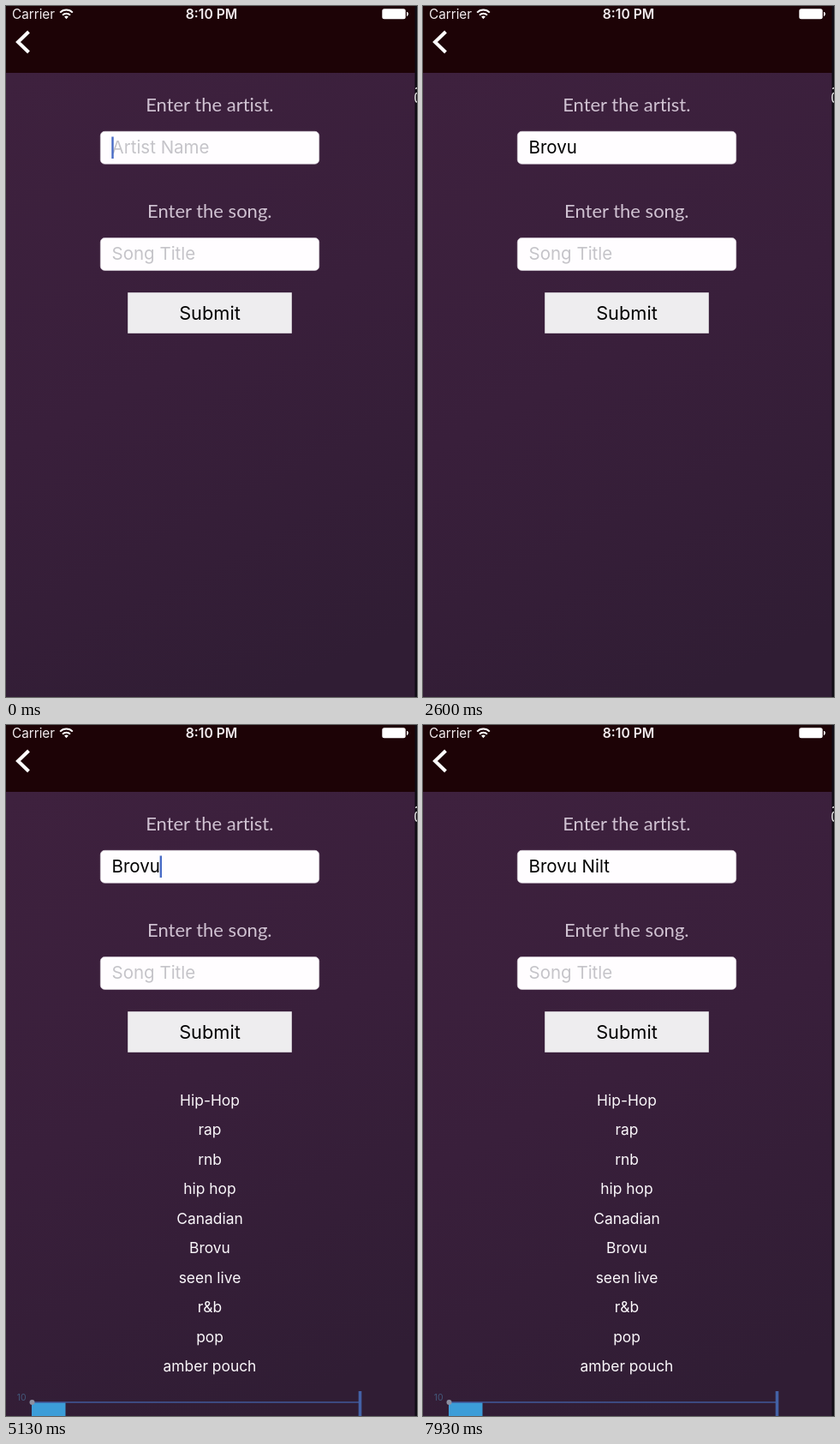
An HTML page for the animation above (8 s loop, 480 by 806 pixels).

```html
<!DOCTYPE html>
<html lang="en">
<head>
<meta charset="utf-8">
<title>Artist lookup</title>
<style>
  html, body { margin: 0; width: 100%; height: 100%; overflow: hidden; background: #12070d; }
  svg { display: block; width: 100%; height: 100%; font: 20.5px Inter, sans-serif; }
  text { white-space: pre; }
  .mid { text-anchor: middle; }
  .label { font: 22px Lato, sans-serif; font-variant-ligatures: none; fill: #d0c2d2; }
  .hint { fill: #c5c4c9; }
  .field { fill: #fffdff; stroke: #d9d1da; stroke-width: .6; }
  .tag { font-size: 17.4px; fill: #fbf8fb; }
  .status { font-size: 15.3px; fill: #f3edef; }
  .clock { font-size: 15.7px; font-weight: 600; }
  .submit { font-size: 21.8px; }
  .axis { font-size: 10.5px; }
</style>
</head>
<body>
<svg viewBox="0 0 480 806">
  <defs>
    <linearGradient id="bg" x1="0.35" y1="0" x2="0.65" y2="1">
      <stop offset="0" stop-color="#3e213e"/>
      <stop offset=".5" stop-color="#391f3b"/>
      <stop offset="1" stop-color="#301d34"/>
    </linearGradient>
  </defs>

  <rect width="478" height="806" fill="url(#bg)"/>
  <rect width="478" height="78" fill="#1d0306"/>
  <rect x="477.5" width="3" height="806" fill="#100d15"/>
  <path d="M480 95.5q-1.2 0-1.4 1.5M480 101.5a2 5 0 0 0 0 10.5" fill="none" stroke="#ddd" stroke-width="1.6"/>

  <!-- status bar -->
  <text class="status" x="7" y="14.5">Carrier</text>
  <path d="M63.2 7.6a10 10 0 0 1 14.6 0M66 10.6a6.4 6.4 0 0 1 9 0" fill="none" stroke="#fff" stroke-width="2"/>
  <path d="M70.5 15.2l-2.4-2.6a3.4 3.4 0 0 1 4.8 0z" fill="#fff"/>
  <text class="status clock mid" x="240" y="14.5">8:10 PM</text>
  <rect x="439.3" y="3.3" width="27.4" height="11.9" rx="2.5" fill="#fff"/>
  <path d="M468.5 7q2 2.2 0 4.5z" fill="#fff" stroke="#fff"/>
  <path d="M26.5 30L14 42l12.5 12" fill="none" stroke="#fff" stroke-width="4"/>

  <!-- form -->
  <text class="label mid" x="237.8" y="122.5">Enter the artist.</text>
  <rect class="field" x="110.3" y="146.3" width="255.4" height="38" rx="5"/>
  <text class="hint" id="hint" x="123.5" y="171.5">Artist Name</text>
  <text id="entry" x="123.5"></text>
  <rect id="caret" y="152.5" width="2.4" height="25.5" fill="#486bc6"/>

  <text class="label mid" x="237.8" y="247">Enter the song.</text>
  <rect class="field" x="110.3" y="270.5" width="255.4" height="38" rx="5"/>
  <text class="hint" x="123.5" y="296">Song Title</text>

  <rect x="142.2" y="334.2" width="191.6" height="47.6" fill="#eeedef"/>
  <text class="submit mid" id="submit" x="238" y="366">Submit</text>

  <!-- answer -->
  <g id="result">
    <g id="tags"></g>
    <text class="axis" id="axis" x="12.8" y="787.7">10</text>
    <rect x="30" y="790" width="39.5" height="16" fill="#3c9dd8"/>
    <path d="M30 790H414" stroke="#41599a" stroke-width="1.6"/>
    <path d="M413.5 777V806" stroke="#4361a6" stroke-width="3.6"/>
    <circle cx="30.5" cy="790" r="3" fill="#8c90a2"/>
  </g>
</svg>

<script>
const LOOP = 8000, PRESS = 2870, RELEASE = 3000, RESULT = 3870, REFOCUS = 4870;
const NAME = "Brovu Nilt";
// one time per typed character
const KEYS = [1500, 1650, 1800, 1950, 2100, 6330, 6530, 6730, 6930, 7130];
const TAGS = ["Hip-Hop", "rap", "rnb", "hip hop", "Canadian", "Brovu",
              "seen live", "r&b", "pop", "amber pouch"];

const $ = id => document.getElementById(id);
const ramp = (v, a, b) => Math.min(1, Math.max(0, (v - a) / (b - a)));

TAGS.forEach((tag, i) => {
  const el = document.createElementNS("http://www.w3.org/2000/svg", "text");
  el.setAttribute("class", "tag mid");
  el.setAttribute("x", 238);
  el.setAttribute("y", 444 + i * 34.45);
  el.textContent = tag;
  $("tags").append(el);
});

function blink(age) {
  const p = age % 1000;
  return 1 - ramp(p, 350, 480) + ramp(p, 860, 1000);
}

function draw(t) {
  const entry = $("entry"), caret = $("caret");
  const typed = KEYS.filter(k => k <= t).length;
  const editing = t < PRESS || t >= REFOCUS;
  const lastTouch = Math.max(0, ...[...KEYS, REFOCUS].filter(k => k <= t));

  entry.textContent = NAME.slice(0, typed);
  entry.setAttribute("y", editing ? 172 : 171.4);
  $("hint").setAttribute("visibility", typed ? "hidden" : "visible");

  caret.setAttribute("x", 123.3 + (typed ? entry.getComputedTextLength() : 0));
  caret.setAttribute("opacity", editing ? blink(t - lastTouch) : 0);

  $("submit").setAttribute("opacity", t < PRESS ? 1 : 0.2 + 0.8 * ramp(t, RELEASE, 3260));
  $("result").setAttribute("visibility", t < RESULT ? "hidden" : "visible");
  $("axis").setAttribute("fill", t < 4730 ? "#5b4f60" : "#43587a");
}

const start = performance.now();
function tick() {
  draw((performance.now() - start) % LOOP);
  requestAnimationFrame(tick);
}
tick();
</script>
</body>
</html>
```
